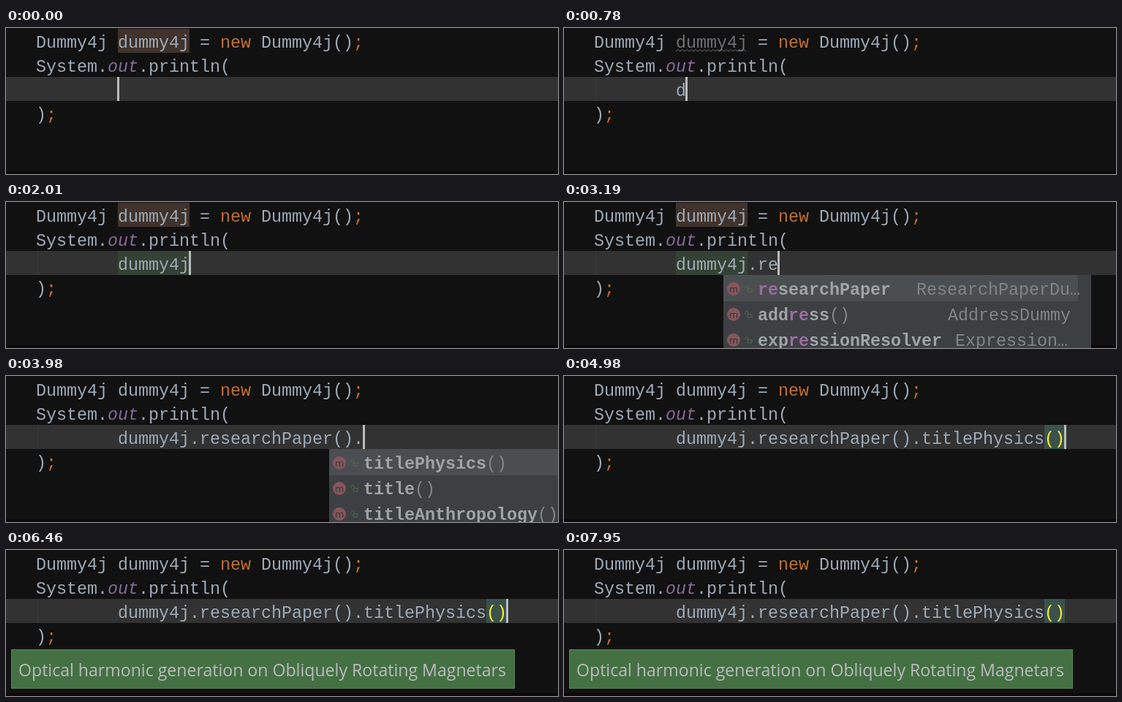
These frames come from a looping animation (755x200 px, 8 s). An HTML page:

```html
<!DOCTYPE html>
<html>
<head>
<meta charset="utf-8">
<style>
  html, body { margin: 0; width: 100%; height: 100%; overflow: hidden; background: #111; }
  svg { display: block; width: 755px; height: 200px; }
  text { white-space: pre; font: 23.33px "Liberation Mono", "Courier New", monospace; fill: #9eabb9; }
  .k { fill: #c0702f; }
  .f { fill: #876a97; font-style: italic; }
  .u { fill: #6f7074; }
  .b { font-weight: bold; fill: #a0a4a6; }
  .g { fill: #828485; }
  .m { fill: #9c6ca4; }
  .y { fill: #ffef28; }
  .icon { font: 13px "Open Sans", sans-serif; fill: #33302f; text-anchor: middle; }
  .hint { font: 11.25px "Open Sans", sans-serif; fill: #bbb; }
  .link { fill: #589df6; text-decoration: underline; }
  .note { font: 23.1px "Open Sans", sans-serif; fill: #bbb; }
</style>
</head>
<body>
<svg id="stage" viewBox="0 0 755 200"></svg>
<script>
const LOOP = 8000, CHAR = 14, LEFT = 41, CODE = LEFT + 8 * CHAR;
const stage = document.getElementById('stage');

const rect = (x, y, w, h, fill, extra = '') =>
  `<rect x="${x}" y="${y}" width="${w}" height="${h}" fill="${fill}" ${extra}/>`;
const text = (x, y, s, cls = '') => `<text x="${x}" y="${y}" class="${cls}">${s}</text>`;
const span = (cls, s) => `<tspan class="${cls}">${s}</tspan>`;
const within = (t, a, b) => t >= a && t < b;

// Typed code: [start time, content of the third line]
const typed = [
  [0, ''], [780, 'd'], [1250, 'du'], [1710, 'dummy4j'], [2330, 'dummy4j.'],
  [2490, 'dummy4j.r'], [3190, 'dummy4j.re'], [3260, 'dummy4j.researchPaper()'],
  [3980, 'dummy4j.researchPaper().'], [4910, 'dummy4j.researchPaper().titlePhysics()']
];

// Rows: [name, arguments, type, x of type]
const variables = [['dummy4j', '', 'Dummy4j', 501], ['double', '', '', 0]];
const methods = [
  ['researchPaper', '', 'ResearchPaperDu…', 482],
  ['address', '()', 'AddressDummy', 525],
  ['expressionResolver', '', 'Expression…', 535]
];
const titles = [['titlePhysics', '()'], ['title', '()'], ['titleAnthropology', '()']];

function icon(x, y, isVar) {
  const badge = `<circle cx="${x + 14}" cy="${y}" r="9" fill="${isVar ? '#997039' : '#85565d'}"/>` +
    text(x + 14, y + 4.5, isVar ? 'V' : 'm', 'icon');
  return badge + (isVar
    ? `<circle cx="${x + 34}" cy="${y}" r="2.3" fill="none" stroke="#78899a" stroke-width="1.5"/>`
    : `<path d="M${x + 30} ${y}v-3q2-3 4 0v3m-1 0h6v4h-6z" fill="none" stroke="#4a6b4a"/>`);
}

function popup(x, w, rows, prefix, isVar, selected = w) {
  let s = rect(x, 100, w, rows.length * 35 + 1, '#3d4042') + rect(x, 100, selected, 36, '#4b4e50');
  rows.forEach(([name, args, type, typeX], i) => {
    const y = 119 + i * 35;
    const label = prefix ? name.replace(prefix, span('m', prefix)) : name;
    s += icon(x, y, isVar) +
      text(x + 47, y + 8, span(isVar ? 'g' : 'b', label) + span('g', args));
    if (type) s += text(typeX, y + 8, type, 'g');
  });
  return s;
}

function hint(y) {
  return rect(106, y, 503, 19, '#3c3f41') +
    text(108, y + 13, 'Press Ctrl+Period to choose the selected (or first) suggestion and insert a dot afterwards', 'hint') +
    text(575, y + 13, '&gt;&gt;', 'hint link');
}

function squiggle() {
  let d = 'M153 32';
  for (let x = 156, up = true; x <= 251; x += 3, up = !up) d += `L${x} ${up ? 29.5 : 32}`;
  return `<path d="${d}" fill="none" stroke="#66676a" stroke-width="1"/>`;
}

function draw(t) {
  const line = typed.filter(([at]) => t >= at).pop()[1];
  const unused = within(t, 230, 2010);
  const usage = within(t, 2010, 3510);
  const brackets = within(t, 3260, 3980) || t >= 4980;
  const caret = !(within(t, 5930, 6460) || within(t, 6920, 7470) || t >= 7950);
  const end = CODE + line.length * CHAR;

  let s = rect(0, 0, 755, 200, '#111') + rect(0, 196, 755, 4, '#0d080a') +
    rect(0, 67, 755, 33, '#323232');
  if (t >= 230) s += rect(43, 67, 1, 33, '#383838');
  if (t < 230 || usage) s += rect(153, 1, 98, 33, '#40332b');
  if (usage) s += rect(153, 67, 98, 33, '#344134');
  if (brackets) s += rect(end - 28, 67, 28, 33, '#3b514d');

  s += text(LEFT, 27, 'Dummy4j ' + span(unused ? 'u' : '', 'dummy4j') + ' = ' +
    span('k', 'new') + ' Dummy4j()' + span('k', ';'));
  if (unused) s += squiggle();
  s += text(LEFT, 60, 'System.' + span('f', 'out') + '.println(');
  s += text(CODE, 93, brackets ? line.slice(0, -2) + span('y', '()') : line);
  s += text(LEFT, 126, ')' + span('k', ';'));
  if (caret) s += rect(end - 1, 67, 3, 33, '#bbb');

  if (within(t, 850, 1250)) s += popup(106, 503, variables, 'd', true) + hint(170);
  if (within(t, 1250, 1710)) s += popup(106, 503, variables.slice(0, 1), 'du', true) + hint(135.5);
  if (within(t, 2410, 3260)) s += popup(218, 503, methods, line.split('.')[1], false, 485);
  if (within(t, 3980, 4910)) s += popup(442, 313, titles, '', false);

  if (t >= 6230) {
    s += `<g opacity="${t < 6310 ? 0.5 : 1}">` +
      rect(7.5, 136.5, 688, 53, '#447044', 'stroke="#5f7f5f"') +
      text(17, 173, 'Optical harmonic generation on Obliquely Rotating Magnetars', 'note') + '</g>';
  }
  return s;
}

let shown = '';
function tick() {
  const next = draw(performance.now() % LOOP);
  if (next !== shown) stage.innerHTML = shown = next;
  requestAnimationFrame(tick);
}
tick();
</script>
</body>
</html>
```
